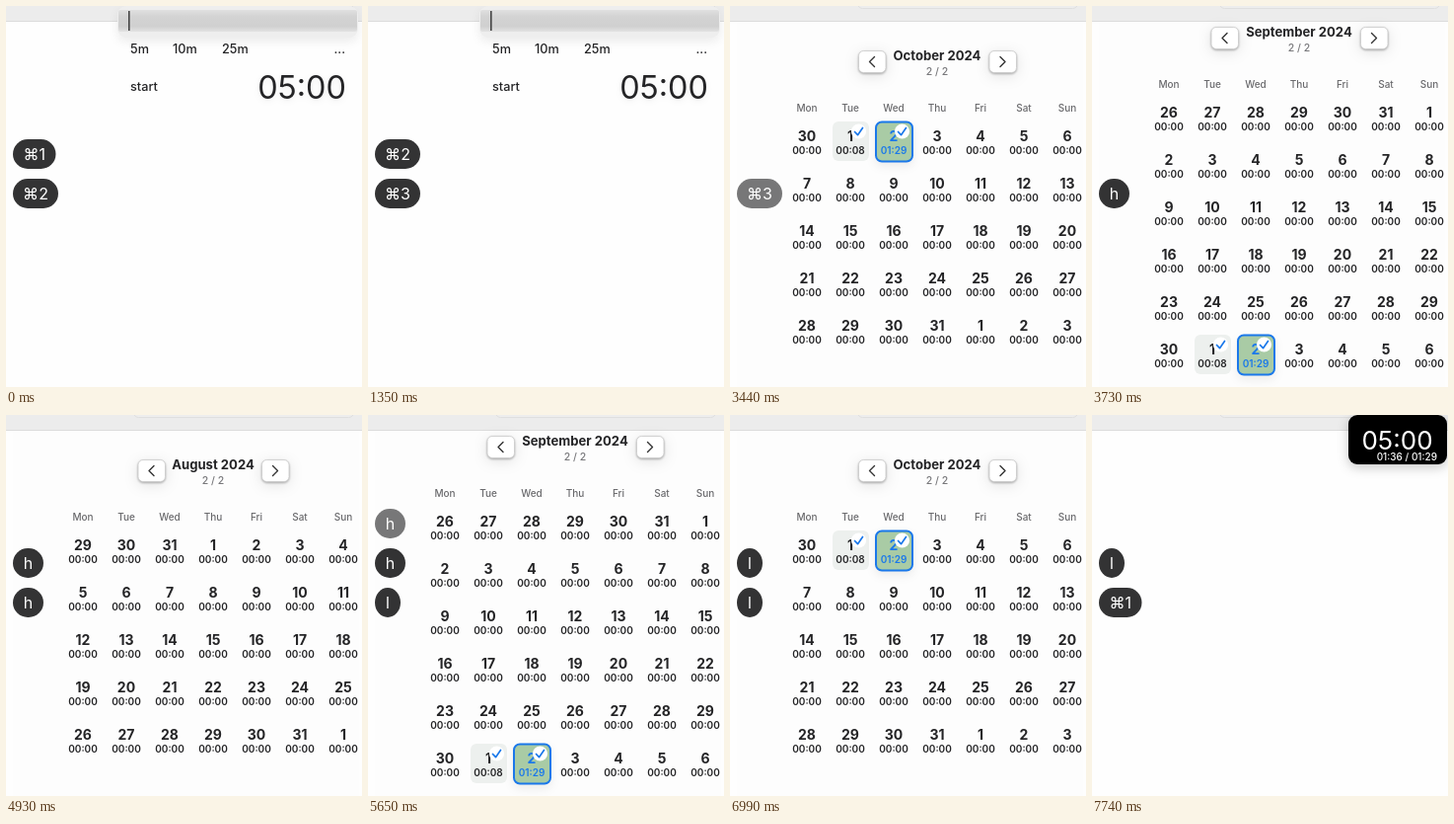
Write an HTML page that moves like this. It is 361 by 386 pixels and loops after 8000 ms.

```html
<!DOCTYPE html>
<html lang="en">
<head>
<meta charset="utf-8">
<title>Timer and calendar shortcuts</title>
<style>
  html, body { margin: 0; width: 100%; height: 100%; overflow: hidden; background: #fefefe; }
  svg { display: block; width: 361px; height: 386px; font-family: Inter, "DejaVu Sans", sans-serif; fill: #242426; }
  .mid { text-anchor: middle; }
  .end { text-anchor: end; }
  .label { font-size: 12.7px; font-weight: 500; }
  .clock { font-size: 32.4px; filter: drop-shadow(0 2px 3px rgba(0,0,0,.06)); }
  .mini { font-size: 26px; fill: #fff; }
  .total { font-size: 10px; font-weight: 500; fill: #fff; }
  .title { font-size: 13.1px; font-weight: 700; }
  .count { font-size: 10.5px; font-weight: 500; fill: #77777a; }
  .week { font-size: 10px; font-weight: 500; fill: #69696c; }
  .day { font-size: 14px; font-weight: 700; }
  .time { font-size: 10px; font-weight: 600; }
  .key { font-size: 16px; fill: #fff; }
  .blue { fill: #1a78ea; }
  .raised { filter: drop-shadow(0 1px 1px rgba(0,0,0,.3)) drop-shadow(0 3px 7px rgba(0,0,0,.1)); }
  .soft { filter: drop-shadow(0 4px 5px rgba(0,0,0,.07)); }
</style>
</head>
<body>
<script>
const NS = "http://www.w3.org/2000/svg";
const LOOP = 8000;

function el(parent, tag, attrs = {}, text) {
  const node = document.createElementNS(NS, tag);
  for (const k in attrs) node.setAttribute(k, attrs[k]);
  if (text !== undefined) node.textContent = text;
  return parent.appendChild(node);
}
const text = (p, x, y, cls, str) => el(p, "text", { x, y, class: cls }, str);
const rect = (p, x, y, width, height, rx, fill, more) =>
  el(p, "rect", { x, y, width, height, rx, fill, ...more });
const line = (p, d, stroke, width) =>
  el(p, "path", { d, fill: "none", stroke, "stroke-width": width, "stroke-linecap": "round", "stroke-linejoin": "round" });

const svg = el(document.body, "svg", { viewBox: "0 0 361 386" });

const defs = el(svg, "defs");
const grad = el(defs, "linearGradient", { id: "field", x1: 0, y1: 0, x2: 0, y2: 1 });
[[0, "#e0e0e0"], [0.3, "#d3d3d3"], [0.75, "#d0d0d0"], [1, "#e2e2e2"]].forEach(([offset, c]) =>
  el(grad, "stop", { offset, "stop-color": c }));

// Window bar
rect(svg, 0, 0, 361, 15, 0, "#ececec");
rect(svg, 0, 15, 361, 1, 0, "#dcdcdc");
rect(svg, 129.5, -15, 223, 17.5, 5, "#ededed", { stroke: "#dfdfdf" });

function timer() {
  const g = el(svg, "g");
  rect(g, 113, 0, 244, 32, 9, "#eeeeee", { class: "soft" });
  rect(g, 114, 4, 242, 22, 2, "url(#field)");
  rect(g, 124, 5, 1.6, 20, 0, "#444");
  text(g, 126, 48, "label", "5m");
  text(g, 169, 48, "label", "10m");
  text(g, 219, 48, "label", "25m");
  text(g, 344, 48, "label end", "...");
  text(g, 126, 86, "label", "start");
  text(g, 345, 94, "clock end", "05:00");
  return g;
}

function miniTimer() {
  const g = el(svg, "g");
  rect(g, 260, 0, 100, 50, 9, "#000", { style: "filter:drop-shadow(0 3px 6px rgba(0,0,0,.22))" });
  text(g, 309.5, 35, "mini mid", "05:00");
  text(g, 350, 46, "total end", "01:36 / 01:29");
  return g;
}

function navButton(g, x, y, dir) {
  rect(g, x, y, 27.5, 22, 5, "#fff", { class: "raised", stroke: "#c9c9c9", "stroke-width": 0.8 });
  const cx = x + 13.5, cy = y + 11;
  line(g, `M${cx - dir * 2.5} ${cy - 5}l${dir * 5} 5l${-dir * 5} 5`, "#333", 1.4);
}

function check(g, cx, cy) {
  el(g, "circle", { cx, cy, r: 7.6, fill: "#fff" });
  line(g, `M${cx - 4} ${cy + 0.5}l3 3.2l5 -7.2`, "#1a78ea", 1.7);
}

// first: day in the top left cell; mark: index of the first tracked day
function calendar({ name, half, first, before, length, rows, mark }) {
  const g = el(svg, "g");
  const top = rows === 6 ? -24 : 0;
  rect(g, 7, 16, 351, 370, 0, "#fdfdfd");
  navButton(g, 210.5 - half - 27.5, 45.5 + top, -1);
  navButton(g, 210.5 + half, 45.5 + top, 1);
  text(g, 210, 55 + top, "title mid", name + " 2024");
  text(g, 210, 70 + top, "count mid", "2 / 2");
  ["Mon", "Tue", "Wed", "Thu", "Fri", "Sat", "Sun"].forEach((d, i) =>
    text(g, 78 + i * 44, 107 + top, "week mid", d));

  let day = first, max = before;
  for (let i = 0; i < rows * 7; i++) {
    const x = 78 + (i % 7) * 44, y = 137 + top + Math.floor(i / 7) * 48;
    const small = i === mark, big = i === mark + 1;
    if (small) rect(g, x - 18, y - 20, 37, 40, 6, "#edf0ee");
    if (big) rect(g, x - 18, y - 19.5, 37, 40, 6, "#a9cba5",
      { stroke: "#1a78ea", "stroke-width": 2, class: "soft" });
    const tint = big ? " blue" : "";
    text(g, x, y, "day mid" + tint, day);
    text(g, x, y + 13.3, "time mid" + tint, small ? "00:08" : big ? "01:29" : "00:00");
    if (small || big) check(g, x + 8.5, y - 10);
    if (++day > max) { day = 1; max = length; }
  }
  return g;
}

const scenes = {
  timer: timer(),
  oct: calendar({ name: "October", half: 52.5, first: 30, before: 30, length: 31, rows: 5, mark: 1 }),
  sep: calendar({ name: "September", half: 62, first: 26, before: 31, length: 30, rows: 6, mark: 36 }),
  aug: calendar({ name: "August", half: 49, first: 29, before: 31, length: 31, rows: 5, mark: -9 }),
  mini: miniTimer()
};

const sceneSteps = [
  [0, "timer"], [1500, "oct"], [3730, "sep"], [4930, "aug"],
  [5650, "sep"], [6240, "oct"], [7290, "mini"]
];

// Pressed keys, oldest first; "~" marks a key that is fading out
const keySteps = [
  [0, "⌘1 ⌘2"], [900, "~⌘1 ⌘2"], [1050, "⌘2"],
  [1350, "⌘2 ⌘3"], [1800, "~⌘2 ⌘3"], [1940, "⌘3"],
  [3440, "~⌘3"], [3580, ""], [3730, "h"], [4930, "h h"],
  [5650, "~h h l"], [5800, "h l"], [6100, "h l l"],
  [6840, "~h l l"], [6990, "l l"], [7290, "l l ⌘1"],
  [7590, "~l l ⌘1"], [7740, "l ⌘1"]
];
const keyWidth = { "⌘1": 43.5, "⌘2": 46, "⌘3": 46, h: 31, l: 26 };
const keys = el(svg, "g");

function drawKeys(list) {
  keys.replaceChildren();
  const names = list ? list.split(" ") : [];
  names.forEach((name, i) => {
    const y = 175 - 40 * (names.length - 1 - i);
    const faded = name[0] === "~";
    const label = faded ? name.slice(1) : name;
    const g = el(keys, "g", { opacity: faded ? 0.66 : 1 });
    const w = keyWidth[label];
    rect(g, 7, y, w, 30, 15, "#333334");
    text(g, 7 + w / 2, y + 21, "key mid", label);
  });
}

const at = (steps, t) => steps.filter(s => s[0] <= t).pop()[1];

let scene, list;
function frame(now) {
  const t = now % LOOP;
  const nextScene = at(sceneSteps, t), nextList = at(keySteps, t);
  if (nextScene !== scene) {
    scene = nextScene;
    for (const k in scenes) scenes[k].style.display = k === scene ? "" : "none";
  }
  if (nextList !== list) drawKeys(list = nextList);
}

const start = performance.now();
function tick() {
  frame(performance.now() - start);
  requestAnimationFrame(tick);
}
tick();
</script>
</body>
</html>
```
